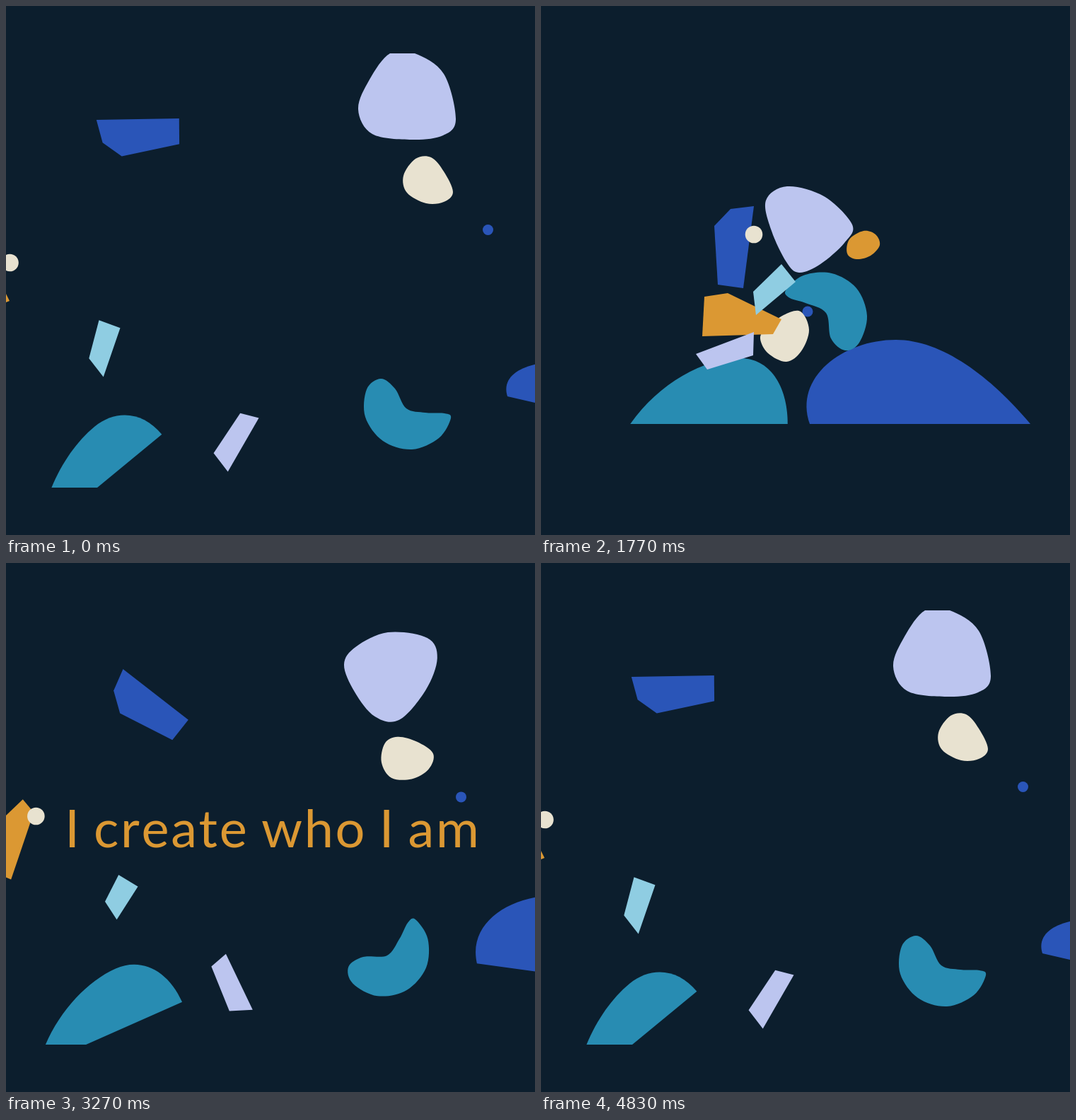
Recreate the animation shown at these times as an HTML page with a canvas. Size 748 by 748 pixels, loop 4.86 s.

```html
<!DOCTYPE html>
<html lang="en">
<head>
<meta charset="utf-8">
<title>I create who I am</title>
<style>
html, body { margin: 0; width: 100%; height: 100%; overflow: hidden; background: #0c1e2d; }
canvas { display: block; }
</style>
</head>
<body>
<canvas id="stage" width="748" height="748"></canvas>
<script>
const ctx = document.getElementById('stage').getContext('2d');
const LOOP = 4860, PART = 2180, REST = 4830, GATHER = 700;
const BG = '#0c1e2d', LAVENDER = '#bcc5ef', CREAM = '#e8e2d0', BLUE = '#2a55b8',
      TEAL = '#288cb2', SKY = '#8fcde2', ORANGE = '#db9833';

const clamp = x => Math.min(1, Math.max(0, x));
const mix = (a, b, f) => a + (b - a) * f;
const smooth = u => u * u * (3 - 2 * u);

// Monotone cubic curve through a few knots.
function curve(xs, ys) {
  const n = xs.length;
  const d = xs.slice(1).map((x, i) => (ys[i + 1] - ys[i]) / (x - xs[i]));
  const m = xs.map((_, i) => i === 0 || i === n - 1 ? 0
    : 2 * d[i - 1] * d[i] / (d[i - 1] + d[i]));
  return x => {
    if (x >= xs[n - 1]) return ys[n - 1];
    let i = 0;
    while (x > xs[i + 1]) i++;
    const h = xs[i + 1] - xs[i], u = (x - xs[i]) / h, v = 1 - u;
    return v * v * (1 + 2 * u) * ys[i] + u * u * (3 - 2 * u) * ys[i + 1]
      + h * u * v * (v * m[i] - u * m[i + 1]);
  };
}

const drift = curve([PART, 2490, 2700, 3270, 4230, REST], [0, .215, .58, .875, .987, 1]);

// How far a shape is from its assembled pose (0) towards its scattered one (1).
function distance(t, starts) {
  if (t < PART) {
    const [x, y, turn] = starts.map(s => smooth(clamp((t - s) / GATHER)));
    const dip = 1 + .12 * Math.sin(Math.PI * clamp((t - 700) / 600));
    return { x: 1 - x, y: 1 - y * dip, turn: 1 - turn, swell: 0 };
  }
  const p = drift(t), turn = 1 - (1 - clamp((t - PART) / (REST - PART))) ** 1.75;
  return { x: p, y: p, turn, swell: Math.sin(Math.PI * turn ** .6) };
}

// Poses are [x, y, degrees]; starts are when x, y and the turn begin to gather.
const actor = (color, starts, near, far, trace) => t => {
  const d = distance(t, starts);
  ctx.save();
  ctx.translate(mix(near[0], far[0], d.x), mix(near[1], far[1], d.y));
  ctx.rotate(mix(near[2], far[2], d.turn) * Math.PI / 180);
  ctx.beginPath();
  trace(d);
  ctx.closePath();
  ctx.fillStyle = color;
  ctx.fill();
  ctx.restore();
};

// Splits a flat outline into its centre and points around that centre.
function outline(flat) {
  const pts = [];
  for (let i = 0; i < flat.length; i += 2) pts.push([flat[i], flat[i + 1]]);
  const mean = k => pts.reduce((s, p) => s + p[k], 0) / pts.length;
  const x = mean(0), y = mean(1);
  return { x, y, pts: pts.map(p => [p[0] - x, p[1] - y]) };
}

const disc = (color, starts, r, near, far) =>
  actor(color, starts, [...near, 0], [...far, 0], () => ctx.arc(0, 0, r, 0, 7));

function polygon(color, starts, flat, far, squash = 0) {
  const { x, y, pts } = outline(flat);
  const axis = Math.atan2(pts[1][1] - pts[0][1], pts[1][0] - pts[0][0]);
  return actor(color, starts, [x, y, 0], far, d => {
    ctx.rotate(axis);
    ctx.scale(1 - squash * d.swell, 1);
    ctx.rotate(-axis);
    pts.forEach(p => ctx.lineTo(...p));
  });
}

function traceSmooth(pts) {
  const n = pts.length, at = i => pts[(i + n) % n];
  ctx.moveTo(...pts[0]);
  for (let i = 0; i < n; i++) {
    const [a, b, c, d] = [at(i - 1), at(i), at(i + 1), at(i + 2)];
    ctx.bezierCurveTo(b[0] + (c[0] - a[0]) / 6, b[1] + (c[1] - a[1]) / 6,
      c[0] - (d[0] - b[0]) / 6, c[1] - (d[1] - b[1]) / 6, ...c);
  }
}

// Soft shape that turns by the best-fitting angle while its outline changes.
function blob(color, starts, nearFlat, farFlat) {
  const near = outline(nearFlat), far = outline(farFlat);
  let cross = 0, dot = 0;
  near.pts.forEach(([a, b], i) => {
    const [x, y] = far.pts[i];
    cross += a * y - b * x;
    dot += a * x + b * y;
  });
  const angle = Math.atan2(cross, dot), c = Math.cos(angle), s = Math.sin(angle);
  const level = far.pts.map(([x, y]) => [x * c + y * s, y * c - x * s]);
  return actor(color, starts, [near.x, near.y, 0], [far.x, far.y, angle * 180 / Math.PI],
    d => traceSmooth(near.pts.map((p, i) => p.map((v, k) => mix(v, level[i][k], d.turn)))));
}

// Mound on a flat base, from two unit curves that meet at its top.
function hill(color, starts, near, far, width, [low, high, swell], up, down) {
  return actor(color, starts, near, far, d => {
    const h = mix(high, low, d.turn) + swell * d.swell;
    const fit = c => c.map((v, i) => i % 2 ? -h * v : width * (v - .5));
    ctx.moveTo(-width / 2, 0);
    ctx.bezierCurveTo(...fit(up));
    ctx.bezierCurveTo(...fit(down));
  });
}

const EARLY = [300, 250, 260];

const shapes = [
  hill(TEAL, [743, 630, 589], [237.5, 591, 0], [134.5, 676.5, -39.5], 222.5, [69, 93, 4],
    [.18, .62, .47, 1, .7, 1], [.88, 1, 1, .6, 1, 0]),
  hill(BLUE, [456, 456, 587], [536, 591, 0], [861, 587, 13], 312, [72, 119, 30],
    [-.075, .55, .15, 1, .39, 1], [.6, 1, .82, .56, 1, 0]),
  blob(ORANGE, [1000, 1000, 1000],
    [433,350, 436,330, 456,318, 473,323, 479,338, 466,353, 446,358],
    [545,142, 548,122, 568,110, 585,115, 591,130, 578,145, 558,150]),
  disc(BLUE, EARLY, 7.5, [377, 432], [681.5, 316.5]),
  blob(CREAM, EARLY,
    [367,432, 379,458, 368,488, 347,503, 321,491, 310,470, 319,455, 343,437],
    [632,263, 619,277, 594,279, 567,264, 562,240, 579,216, 601,214, 619,234]),
  blob(TEAL, [300, 400, 260],
    [346,402, 371,381, 411,378, 446,399, 461,438, 450,476, 430,487, 410,470, 403,434, 374,420, 352,413],
    [629,583, 612,611, 574,627, 533,615, 508,581, 510,542, 530,527, 550,541, 566,569, 593,575, 620,576]),
  blob(LAVENDER, [1000, 1000, 687],
    [318,275, 348,255, 400,269, 440,309, 429,335, 395,365, 365,377, 347,362, 326,318],
    [636,160, 618,183, 574,189, 518,181, 498,146, 514,104, 543,67, 578,67, 619,96]),
  polygon(ORANGE, [725, 725, 445], [231,411, 264,406, 340,443, 328,464, 228,467], [-42.3, 383.7, -115]),
  polygon(LAVENDER, [736, 533, 666], [219,492, 301,461, 300,494, 235,514], [324, 612.3, 140.7]),
  polygon(SKY, EARLY.with(0, 587), [300,404, 340,365, 360,390, 304,437], [137, 480.5, -31], .33),
  polygon(BLUE, [960, 960, 778], [301,283, 268,287, 245,311, 250,394, 286,399], [183.6, 184.2, -98.4]),
  disc(CREAM, [725, 250, 0], 12.3, [301, 323], [5.5, 363])
];

const PHRASE = [...'I create who I am'];

// Letters spread from a tight cluster, then fade from the middle outwards.
function drawPhrase(t) {
  if (t < 2200 || t > 4800) return;
  ctx.font = '74px Lato, sans-serif';
  ctx.fillStyle = ORANGE;
  const gap = 9.5 - 24.7 * Math.exp((2490 - t) / 612);
  const widths = PHRASE.map(c => ctx.measureText(c).width - (c === ' ' ? 4 : 0));
  const total = widths.reduce((a, b) => a + b) + gap * (PHRASE.length - 1);
  let x = 376 + .69 * Math.min(0, gap) - total / 2;
  PHRASE.forEach((c, i) => {
    const edge = Math.abs(i - 8) / 8;
    ctx.globalAlpha = clamp((t - 2200) / 160) * (1 - clamp((t - 4140 - 120 * edge) / 500));
    ctx.fillText(c, x, 402);
    x += widths[i] + gap;
  });
  ctx.globalAlpha = 1;
}

function render(t) {
  ctx.fillStyle = BG;
  ctx.fillRect(0, 0, 748, 748);
  ctx.save();
  ctx.beginPath();
  ctx.rect(0, 67, 748, 614);
  ctx.clip();
  drawPhrase(t);
  shapes.forEach(draw => draw(t));
  ctx.restore();
}

const start = performance.now();
function tick() {
  render((performance.now() - start) % LOOP);
  requestAnimationFrame(tick);
}
tick();
</script>
</body>
</html>
```
